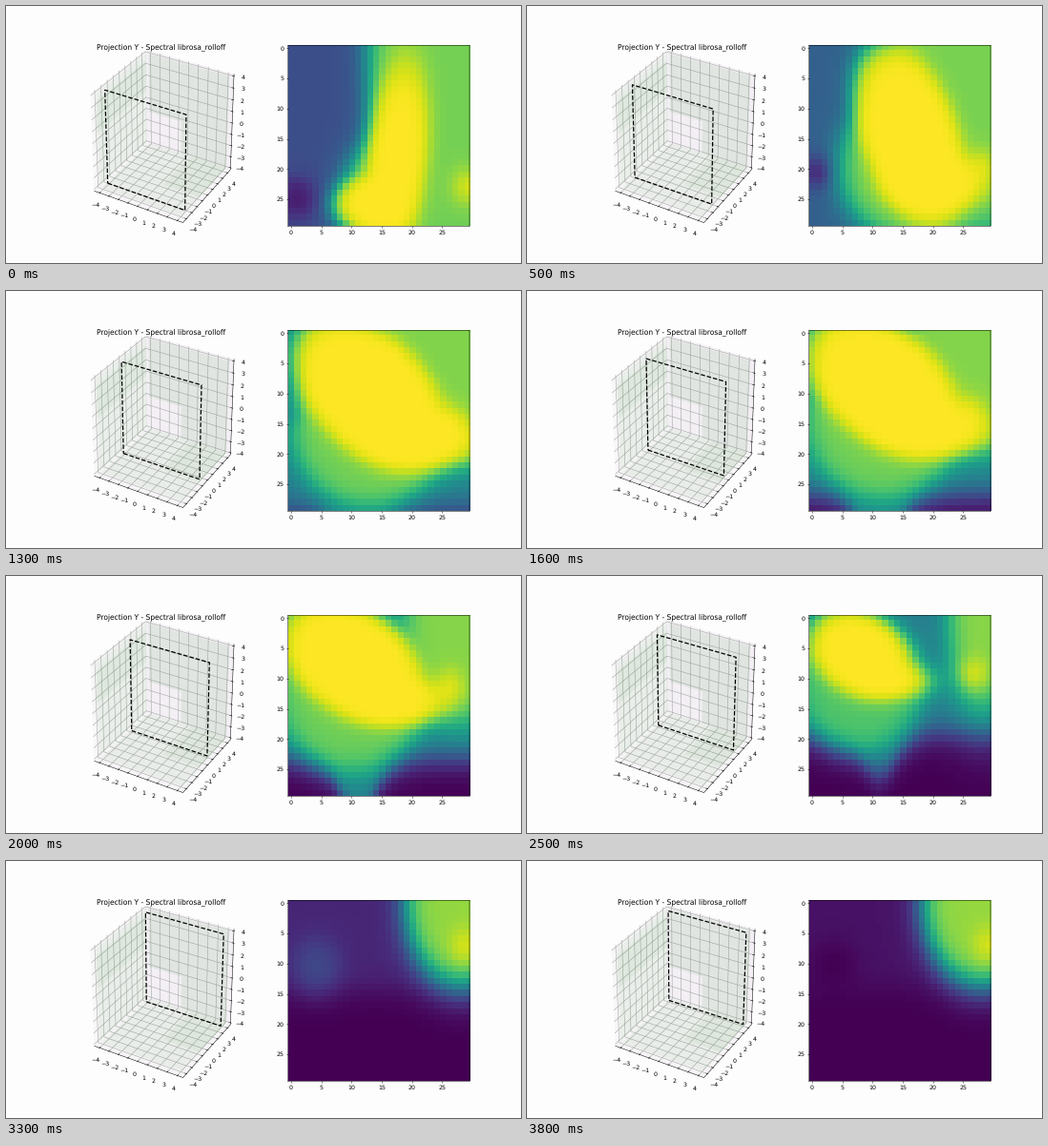
Write a matplotlib script that moves like this. It is 540 px wide and 270 px high and loops after 3900 ms.

```python
import numpy as np
import matplotlib.pyplot as plt
from matplotlib.animation import FuncAnimation
from matplotlib.patches import Polygon

W, H, DPI = 540, 270, 45
FRAMES, INTERVAL = 39, 100
ARRIVE = 34.4                         # step at which the plane reaches the back
N = 30
LIM = np.array([4.37, 4.44, 4.0])     # half range of each 3D axis
PANE = 0.5 + 1 / 48                   # panes sit slightly outside the limits
GREEN = "#1a7a1a"

plt.rcParams.update({"font.family": "DejaVu Sans", "text.hinting": "none",
                     "path.snap": False})
fig = plt.figure(figsize=(W / DPI, H / DPI), dpi=DPI, facecolor="#fefdfe")

canvas = fig.add_axes([0, 0, 1, 1])
canvas.set_xlim(0, W)
canvas.set_ylim(H, 0)
canvas.axis("off")


# ---------- 3D box, drawn with its own perspective ----------

def project(p):
    """Unit-cube point to stage pixels (elevation 30, azimuth -60)."""
    x, y, z = p
    s = np.sqrt(3) / 2
    depth = 10 - (s / 2 * x - 0.75 * y + 0.5 * z)
    u = (s * x + 0.5 * y) / depth
    v = (-0.25 * x + s / 2 * y + s * z) / depth
    return (67.5 + (u + 0.095) / 0.185 * 190.23,
            240.3 - (v + 0.095) / 0.185 * 207.9)


def line(points, **style):
    xs, ys = zip(*(project(p) for p in points))
    return canvas.plot(xs, ys, **style)[0]


def put(axis, value, others):
    return np.insert(np.array(others, float), axis, value)


def face(axis, at, a, b, color, alpha=1.0, z=1):
    """Filled rectangle on the plane where one coordinate is constant."""
    corners = [(a[0], b[0]), (a[1], b[0]), (a[1], b[1]), (a[0], b[1])]
    points = [project(put(axis, at, c)) for c in corners]
    canvas.add_patch(Polygon(points, closed=True, facecolor=color,
                             edgecolor="none", alpha=alpha, zorder=z))


full = (-PANE, PANE)
face(0, -PANE, full, full, "#f8f6f8")
face(1, PANE, full, full, "#f3eff4")
face(2, -PANE, full, full, "#f6f4f6")

# grid: each pane carries the ticks of its two axes
grid = dict(color="#a4a8a4", lw=0.9, zorder=2)
for v in range(-4, 5):
    x, y, z = v / (2 * LIM)
    line([(x, PANE, PANE), (x, PANE, -PANE), (x, -PANE, -PANE)], **grid)
    line([(-PANE, y, PANE), (-PANE, y, -PANE), (PANE, y, -PANE)], **grid)
    line([(-PANE, -PANE, z), (-PANE, PANE, z), (PANE, PANE, z)], **grid)

# pale density wash on the walls, leaving a gap in the back one
span = (-0.46, 0.5)
wash = [
    (0, -0.5, span, (-0.5, 0.5), 0.06),
    (0, -0.5, span, (0.08, 0.42), 0.05),
    (1, 0.5, (-0.47, -0.07), (-0.14, 0.5), 0.08),
    (1, 0.5, (-0.07, 0.48), (-0.5, 0.5), 0.08),
    (2, -0.5, (-0.47, 0.48), span, 0.06),
    (2, -0.5, (0.05, 0.48), (-0.1, 0.5), 0.05),
]
for axis, at, a, b, alpha in wash:
    face(axis, at, a, b, GREEN, alpha, z=3)

# axis lines, ticks and labels
edge = dict(color="black", lw=0.8, zorder=4)
line([(-PANE, -PANE, -PANE), (PANE, -PANE, -PANE),
      (PANE, PANE, -PANE), (PANE, PANE, PANE)], **edge)
OFF = PANE + 0.0722
TIN, TOUT = PANE - 1 / 60, PANE + 1 / 120
ticks = [
    (0, (-TIN, -PANE), (-TOUT, -PANE), (-OFF, -OFF)),
    (1, (TIN, -PANE), (TOUT, -PANE), (OFF, -OFF)),
    (2, (TIN, PANE), (TOUT, PANE), (OFF, OFF)),
]
for axis, inner, outer, label in ticks:
    for v in range(-4, 5):
        pos = v / (2 * LIM[axis])
        line([put(axis, pos, inner), put(axis, pos, outer)], **edge)
        canvas.text(*project(put(axis, pos, label)),
                    str(v).replace("-", "\u2212"),
                    size=10, ha="center", va="top", zorder=5)

canvas.text(162.6, 45.4, "Projection Y - Spectral librosa_rolloff",
            size=12, ha="center", va="baseline")
frame_line = line([(0, 0, 0)], color="black", lw=2, ls="--", zorder=6)


# ---------- slice image: soft ellipses drifting over a sinking ground ----------

rows, cols = np.mgrid[0:N, 0:N].astype(float)


def sigmoid(v):
    return 1 / (1 + np.exp(-np.clip(v, -30, 30)))


def blob(img, cx, cy, rx, ry, level, soft=1.0, angle=0):
    """Blend the image toward a level inside a soft-edged ellipse."""
    c, s = np.cos(np.radians(angle)), np.sin(np.radians(angle))
    dx, dy = cols - cx, rows - cy
    rx, ry = max(rx, 0.1), max(ry, 0.1)
    r = np.hypot((dx * c + dy * s) / rx, (dy * c - dx * s) / ry)
    img += (level - img) * sigmoid((1 - r) * min(rx, ry) / soft)


def slice_image(p):
    """Field on the plane after a share p of its way to the back."""
    q = 1 - p
    fade = max(1 - (p / 0.9) ** 4, 0)
    grow = np.tanh(5 * p)

    # ground level, cut off below a horizon that rises with p
    level = np.interp(p, [0, 0.5, 0.7, 1], [0.24, 0.47, 0.45, 0.05])
    tongue = 12 * fade * np.exp(-((cols - 11) / 4) ** 2)
    horizon = 14 + 31 * q ** 1.4 + tongue
    img = level * sigmoid((horizon - rows) / 1.4)

    # dark spot at the left, green mass at the right
    dark = 3 * max(1 - 2 * p, 0)
    blob(img, 1, 25 - 30 * p, dark, dark, 0.07)
    width = np.interp(p, [0, 0.4, 0.73, 1], [15.5, 14, 5.5, 10])
    blob(img, 28, 0, width, 14 + 26 * q ** 2.5, 0.79 + 0.05 * p, 1.1)

    # main body with its green halo and its foot
    cx, cy = 17.5 - 14 * p ** 1.15, 5 + 13 * q ** 2
    long, short = 16 * fade, (5 + 5 * grow) * fade ** 0.7
    blob(img, cx, cy + 5.5, short + 3.5, short + 4,
         0.79 * (1 - p ** 8), 1.2)
    blob(img, 29 - 3 * np.sin(np.pi * p), 7 + 16 * q ** 1.5,
         2, 2.3, 0.95, 0.9)
    body = min(1, 6 * fade)
    if body > 0:
        blob(img, cx, cy, long, short, body, 0.7, 30 + 65 * q ** 3)
        blob(img, cx + (14 * grow - 4.5) * fade, cy + 8 * fade,
             (6 + 4 * grow) * fade, 4.7 * fade, body, 0.7)
    return img


side = 0.775 / 2.2
ax = fig.add_axes([0.9 - side, 0.495 - side, side, 2 * side])
picture = ax.imshow(np.zeros((N, N)), cmap="viridis", vmin=0, vmax=1,
                    interpolation="nearest")
ax.set_xticks(range(0, N, 5))
ax.set_yticks(range(0, N, 5))


def update(i):
    p = min(i / ARRIVE, 1)
    x, y = 2 / LIM[0], -0.365 + 0.815 * p
    loop = [(-x, y, -0.5), (x, y, -0.5), (x, y, 0.5),
            (-x, y, 0.5), (-x, y, -0.5)]
    frame_line.set_data(*zip(*(project(c) for c in loop)))
    picture.set_data(slice_image(p))
    return frame_line, picture


anim = FuncAnimation(fig, update, frames=FRAMES, interval=INTERVAL,
                     repeat=True, repeat_delay=0, blit=False)
plt.show()
```
